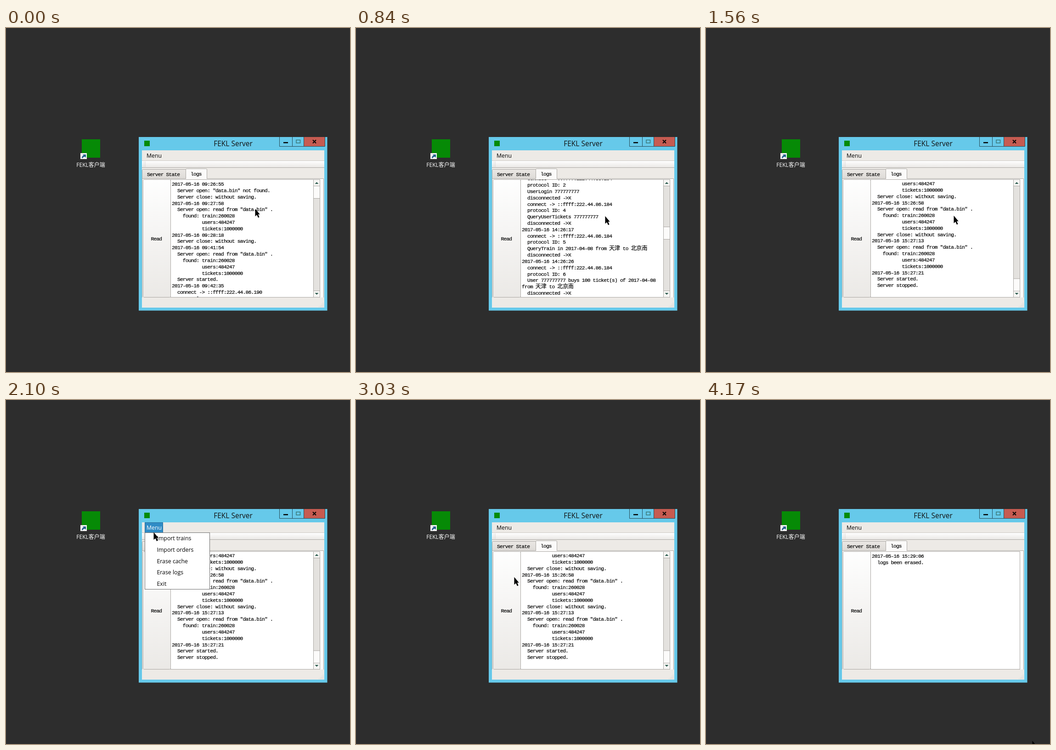
Write an HTML page that moves like this. It is 749 by 748 pixels and loops after 4200 ms.

```html
<!DOCTYPE html>
<html lang="en">
<head>
<meta charset="utf-8">
<title>Server log window</title>
<style>
  html, body { margin: 0; width: 100%; height: 100%; overflow: hidden; background: #2d2d2d; }
  svg { display: block; }
  text { white-space: pre; font: 12.3px "Open Sans", "Noto Sans CJK SC", sans-serif; }
  .mono text {
    font: 11.3px "Liberation Mono", "Noto Sans CJK SC", monospace;
    letter-spacing: -.84px; stroke: #000; stroke-width: .2px;
  }
  .cjk { font: 12px "Noto Sans CJK SC", sans-serif; letter-spacing: -.12px; }
  .line { fill: none; stroke: #aba8a4; }
</style>
</head>
<body>
<svg width="749" height="748" viewBox="0 0 749 748">
  <defs>
    <linearGradient id="soft" x2="0" y2="1">
      <stop stop-color="#fefefe"/><stop offset="1" stop-color="#ebe9e6"/>
    </linearGradient>
    <linearGradient id="tab" x2="0" y2="1">
      <stop stop-color="#eae7e4"/><stop offset="1" stop-color="#dedbd7"/>
    </linearGradient>
    <pattern id="dots" width="3" height="3" patternUnits="userSpaceOnUse">
      <rect width="1" height="1" fill="#b3b0ab"/>
    </pattern>
  </defs>

  <!-- desktop shortcut -->
  <rect x="165" y="242" width="40" height="40" fill="#068a06"/>
  <rect x="162" y="272" width="14" height="13" fill="#f4f4f4"/>
  <path d="M165 283q0-5 4-6l-2-2h7v7l-2-2q-4 0-5 3z" fill="#24608f"/>
  <text x="184.500" y="301.500" text-anchor="middle" fill="#fff" style="font-size:12px">FEKL客户端</text>

  <!-- window frame -->
  <rect x="289" y="237" width="410.500" height="377.500" fill="#66c9ea"/>
  <rect x="301" y="245" width="12" height="12" fill="#068a06"/>
  <text x="494.500" y="256.500" text-anchor="middle" fill="#111" style="font-size:15.5px">FEKL Server</text>
  <rect x="649" y="237" width="45" height="20" fill="#c65b51"/>
  <path d="M595.500 237v20.500h99V237M623.500 237v20M648.500 237v20" fill="none" stroke="#284b57"/>
  <rect x="604" y="248" width="10" height="2.500"/>
  <rect x="632" y="243.500" width="8.500" height="6.500" fill="none" stroke="#3c7c7d" stroke-width="1.600"/>
  <path d="M668 243.500l7 7m0-7l-7 7" stroke="#000" stroke-width="2"/>

  <!-- menu bar, toolbar, tabs -->
  <rect x="296" y="266" width="397" height="342" fill="#edeae6"/>
  <rect x="296" y="289" width="397" height="14" fill="url(#soft)"/>
  <path class="line" d="M296 288.500h397" stroke-opacity=".5"/>
  <path class="line" d="M296 303.500h397"/>
  <rect x="300" y="291" width="5" height="11" fill="url(#dots)"/>
  <rect id="head" x="302.500" y="266.500" width="39" height="22" fill="#308cc6" stroke="#2a6e9a"/>
  <text id="menu" x="306" y="281.500">Menu</text>
  <rect x="296" y="327" width="396" height="259" fill="#fbfaf9"/>
  <path class="line" d="M296.500 586V327.500h395V586"/>
  <path d="M296.500 327.500v-18q0-2 2-2h93v20z" fill="url(#tab)" stroke="#aba8a4"/>
  <path d="M391.500 328v-20q0-2 2-2h42q2 0 2 2v20" fill="#fbfaf9" stroke="#aba8a4"/>
  <g class="mono">
    <text x="307" y="321.500">Server State</text>
    <text x="402" y="320.500">logs</text>
    <rect x="298.500" y="329.500" width="60" height="256" rx="2" fill="url(#soft)" stroke="#aba8a4"/>
    <text x="315.500" y="461.500">Read</text>
  </g>
  <path d="M681 607l11-11v11z" fill="url(#dots)"/>

  <!-- log view -->
  <rect x="358.500" y="329.500" width="325" height="256" fill="#fff" stroke="#aba8a4"/>
  <svg x="359" y="330" width="324" height="255" viewBox="359 330 324 255">
    <g id="log" class="mono"></g>
    <g id="erased" class="mono"></g>
  </svg>
  <g id="bar">
    <rect x="669.500" y="329.500" width="14" height="256" fill="#e4e2df" stroke="#aba8a4"/>
    <path d="M670 330h13v13h-13zM670 572h13v13h-13z" fill="#f7f6f4"/>
    <path class="line" d="M670 343.500h13M670 571.500h13"/>
    <path d="M672.500 339l4-4 4 4zM672.500 576l4 4 4-4z" fill="#2d5b50"/>
    <rect id="thumb" x="669.500" width="14" height="27" fill="#fcfbfa" stroke="#aba8a4"/>
  </g>

  <g id="popup">
    <rect x="302.500" y="288.500" width="141" height="123" fill="#fff" stroke="#6f6f6f"/>
    <rect id="mark" x="302.500" width="141" height="24" fill="#308cc6" stroke="#2a6e9a"/>
  </g>
  <path id="cursor" d="M-.5 0V16.500L3.300 13.200 6 19.400 8.600 18.300 5.900 12.300H9.800Z"/>
</svg>

<script>
const $ = id => document.getElementById(id);
const LOOP = 4200, STEP = 30, ROW = 13.82, MAX = 131 * ROW + 1;
const USER = '777777777', IP = '::ffff:222.44.86.';

function addText(parent, x, y, str) {
  const el = document.createElementNS('http://www.w3.org/2000/svg', 'text');
  el.setAttribute('x', x);
  el.setAttribute('y', y);
  el.innerHTML = str.replace(/[\u4e00-\u9fff]+/g, '<tspan class="cjk">$&</tspan>');
  parent.append(el);
  return el;
}

// Log contents
const rows = [];
const add = (...lines) => rows.push(...lines);
const stamp = time => add('2017-05-16 ' + time);
const close = () => add('  Server close: without saving.');
const load = () => add('  Server open: read from "data.bin" .', '    found: train:260028',
  '           users:484247', '           tickets:1000000');
const session = (host, id, ...action) =>
  add('  connect -&gt; ' + IP + host, '  protocol ID: ' + id, ...action, '  disconnected -&gt;X');
const login = host => session(host, 2, '  UserLogin ' + USER);
const query = host => session(host, 4, '  QueryUserTickets ' + USER);
const search = host => session(host, 5, '  QueryTrain in 2017-04-08 from 天津 to 北京南');
const buy = host => session(host, 6, '  User ' + USER + ' buys 100 ticket(s) of 2017-04-08',
  'from 天津 to 北京南');

stamp('09:26:55');
add('  Server open: "data.bin" not found.');
close();
stamp('09:27:58'); load();
stamp('09:28:18'); close();
stamp('09:41:54'); load();
add('  Server started.');
stamp('09:42:35'); login(190);
stamp('09:57:50'); load();
stamp('09:57:58'); close();
stamp('09:59:03'); login(189); query(189);
stamp('10:01:01'); login(189); query(189);
stamp('10:01:26'); search(189);
stamp('10:02:14'); query(189);
stamp('14:26:02'); login(184); query(184);
stamp('14:26:17'); search(184);
stamp('14:26:26'); buy(184);
for (let i = 0; i < 10; i++) {
  stamp(`14:${30 + i * 2}:${10 + i * 7 % 50}`);
  [query, search, login][i % 3](184);
}
stamp('15:26:31'); close();
stamp('15:26:40'); load(); close();
stamp('15:26:58'); load(); close();
stamp('15:27:13'); load();
stamp('15:27:21');
add('  Server started.', '  Server stopped.');

const print = (group, lines) => lines.forEach((s, i) => addText(group, 361.1, 343.1 + i * ROW, s));
print($('log'), rows);
print($('erased'), ['2017-05-16 15:29:06', '  logs been erased.']);

const items = ['Import trains', 'Import orders', 'Erase cache', 'Erase logs', 'Exit']
  .map((s, i) => addText($('popup'), 328.5, 305.3 + i * 24.6, s));

// Keys: [time, value, value...], linear in between
const scrollKeys = [[210, 0], [450, 20 * ROW + 2], [840, 58 * ROW - 2], [1290, MAX]];
const cursorKeys = [
  [0, 543, 393], [210, 543, 409], [1530, 543, 409], [1560, 540, 408], [1680, 488, 378],
  [1860, 372, 306], [1980, 326, 283], [2070, 322, 285], [2130, 322, 290], [2310, 326, 345],
  [2460, 331, 392], [2610, 331, 394], [2730, 335, 378], [2820, 335, 378], [3000, 345, 385],
  [3030, 345, 385], [3150, 336, 391], [3330, 336, 391], [3480, 398, 448], [3720, 600, 642],
  [3870, 695, 732], [3900, 697, 735]
];

function at(keys, t) {
  const n = keys.findIndex(k => k[0] > t);
  if (n < 0) return keys.at(-1).slice(1);
  if (n === 0) return keys[0].slice(1);
  const a = keys[n - 1], b = keys[n], f = (t - a[0]) / (b[0] - a[0]);
  return a.slice(1).map((v, i) => v + (b[i + 1] - v) * f);
}

const show = (id, on) => $(id).style.display = on ? '' : 'none';

function draw() {
  const t = Math.floor(performance.now() % LOOP / STEP) * STEP;
  const [scroll] = at(scrollKeys, t);
  const [x, y] = t >= 4170 ? [711, 741] : at(cursorKeys, t);
  const erased = t >= 3090, open = t >= 2040 && t < 2820;
  const hover = t >= 1980 && t < 2820;
  const row = y >= 289 ? Math.min(4, Math.floor((y - 289) / 24.5)) : -1;

  $('log').setAttribute('transform', `translate(0 ${-scroll})`);
  $('thumb').setAttribute('y', 343.5 + 201.5 * scroll / MAX);
  $('cursor').setAttribute('transform', `translate(${x} ${y})`);
  $('mark').setAttribute('y', 288.9 + row * 24.6);
  $('menu').setAttribute('fill', hover ? '#fff' : '#000');
  items.forEach((el, i) => el.setAttribute('fill', i === row ? '#fff' : '#000'));

  show('log', !erased);
  show('bar', !erased);
  show('erased', erased);
  show('head', hover);
  show('popup', open);
  show('mark', row >= 0);
  show('cursor', t < 3930 || t >= 4170);
  requestAnimationFrame(draw);
}
draw();
</script>
</body>
</html>
```
